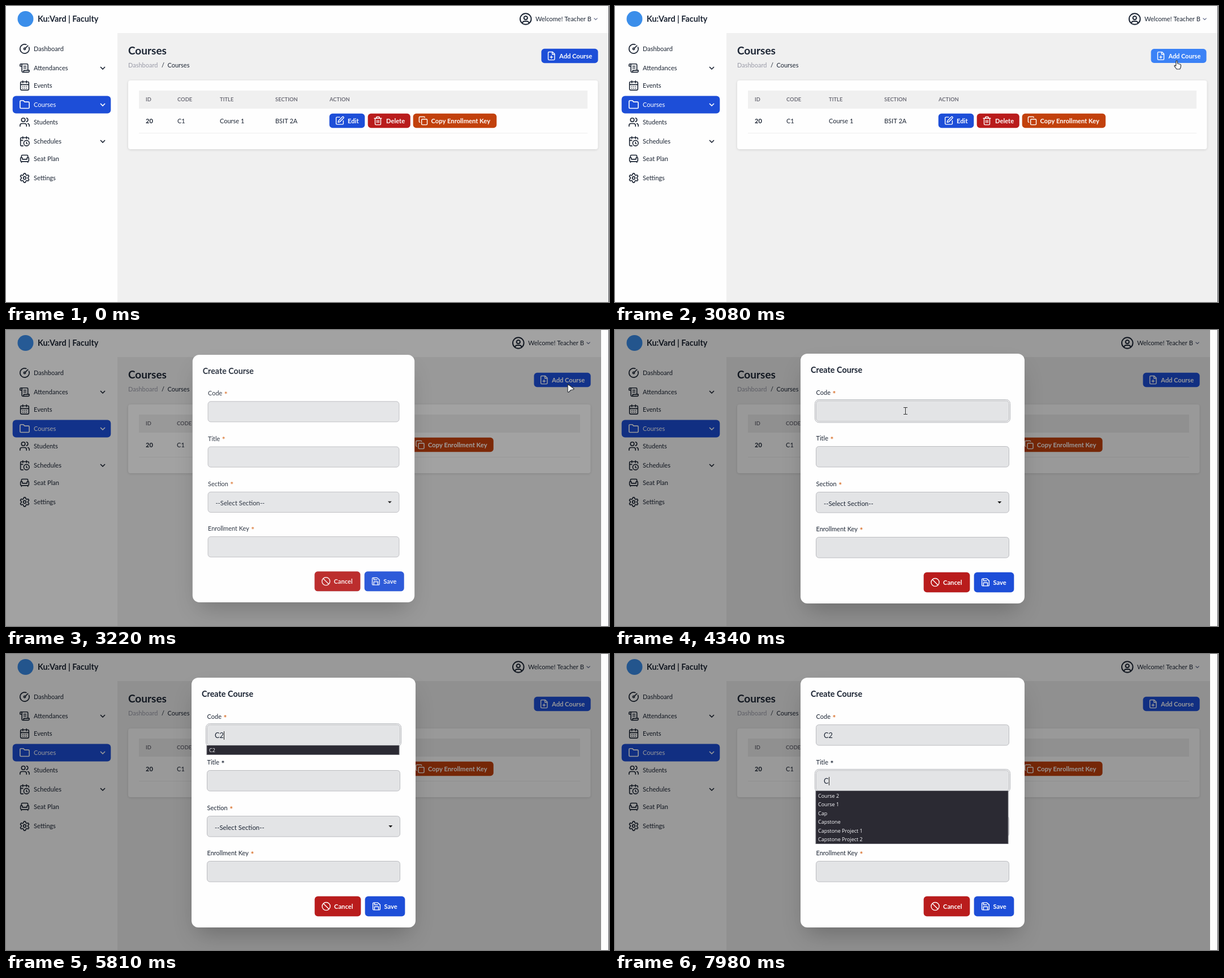
An HTML page with a canvas that plays this animation: 1066x525 px, repeating every 8000 ms.

```html
<!DOCTYPE html>
<html lang="en">
<head>
<meta charset="utf-8">
<title>Courses</title>
<style>
  html, body { margin: 0; width: 100%; height: 100%; overflow: hidden; background: #fff; }
  canvas { display: block; width: 1066px; height: 525px; }
</style>
</head>
<body>
<canvas id="stage" width="1066" height="525"></canvas>
<script>
const ctx = document.getElementById('stage').getContext('2d');
const LOOP = 8000, STEP = 70, OPEN_AT = 3110;
const INK = '#1b2433', BLUE = '#1d4ed8', RED = '#b91c1c', ORANGE = '#c2410c';

const circle = (x, y, r) => `M${x - r} ${y}a${r} ${r} 0 1 0 ${2 * r} 0a${r} ${r} 0 1 0 ${-2 * r} 0`;
const box = (x, y, w, h) => `M${x + 2} ${y}h${w - 4}a2 2 0 0 1 2 2v${h - 4}a2 2 0 0 1-2 2h${4 - w}a2 2 0 0 1-2-2v${4 - h}a2 2 0 0 1 2-2z`;

// Six-toothed gear outline in polar form
function gearPath() {
  let d = '';
  for (let i = 0; i < 96; i++) {
    const a = i / 96 * Math.PI * 2, r = 8.6 + 1.5 * Math.tanh(2 * Math.cos(6 * (a + Math.PI / 2)));
    d += `${i ? 'L' : 'M'}${12 + r * Math.cos(a)} ${12 + r * Math.sin(a)}`;
  }
  return d + 'z' + circle(12, 12, 3);
}

const navIcons = {
  gauge: 'M15.6 2.7a10 10 0 1 0 5.7 5.7M13.4 10.6 19 5' + circle(12, 12, 2),
  scroll: 'M15 12h-5M15 8h-5M19 17V5a2 2 0 0 0-2-2H4M8 21h12a2 2 0 0 0 2-2v-2H10v2a2 2 0 1 1-4 0V5a2 2 0 1 0-4 0v3h4',
  calendar: 'M8 2v4M16 2v4M3 10h18' + box(3, 4, 18, 18) + [8, 12, 16].map(x => `M${x} 14h.01M${x} 18h.01`).join(''),
  folder: 'M20 20a2 2 0 0 0 2-2V8a2 2 0 0 0-2-2h-8l-3-3H4a2 2 0 0 0-2 2v13a2 2 0 0 0 2 2z',
  users: 'M16 21v-2a4 4 0 0 0-4-4H6a4 4 0 0 0-4 4v2M22 21v-2a4 4 0 0 0-3-3.9M16 3.1a4 4 0 0 1 0 7.8' + circle(9, 7, 4),
  clock: 'M21 7.5V6a2 2 0 0 0-2-2H5a2 2 0 0 0-2 2v14a2 2 0 0 0 2 2h3.5M16 2v4M8 2v4M3 10h5M17.5 17.5 16 16.3V14' + circle(16, 16, 6),
  seat: 'M19 9V6a2 2 0 0 0-2-2H7a2 2 0 0 0-2 2v3M3 16a2 2 0 0 0 2 2h14a2 2 0 0 0 2-2v-5a2 2 0 0 0-4 0v2H7v-2a2 2 0 0 0-4 0zM5 18v2M19 18v2',
  gear: gearPath()
};
const toolIcons = {
  user: circle(12, 12, 10) + circle(12, 10, 3.2) + 'M6.2 18.9a4 4 0 0 1 3.8-2.9h4a4 4 0 0 1 3.8 2.9',
  filePlus: 'M15 2H6a2 2 0 0 0-2 2v16a2 2 0 0 0 2 2h12a2 2 0 0 0 2-2V7zM14 2v6h6M9 15h6M12 12v6',
  edit: 'M12 3H5a2 2 0 0 0-2 2v14a2 2 0 0 0 2 2h14a2 2 0 0 0 2-2v-7M18.4 2.6a2.1 2.1 0 0 1 3 3L12 15l-4 1 1-4z',
  trash: 'M3 6h18M19 6v14a2 2 0 0 1-2 2H7a2 2 0 0 1-2-2V6M8 6V4a2 2 0 0 1 2-2h4a2 2 0 0 1 2 2v2M10 11v6M14 11v6',
  copy: box(8, 8, 14, 14) + 'M4 16a2 2 0 0 1-2-2V4a2 2 0 0 1 2-2h10a2 2 0 0 1 2 2',
  ban: circle(12, 12, 10) + 'M4.9 4.9l14.2 14.2',
  save: 'M15 3H5a2 2 0 0 0-2 2v14a2 2 0 0 0 2 2h14a2 2 0 0 0 2-2V8zM17 21v-8H7v8M7 3v5h8'
};
const icons = {};
for (const [k, d] of Object.entries({ ...navIcons, ...toolIcons })) icons[k] = new Path2D(d);

function rect(x, y, w, h, color) { ctx.fillStyle = color; ctx.fillRect(x, y, w, h); }

function round(x, y, w, h, r, fill, stroke) {
  ctx.beginPath();
  ctx.roundRect(x, y, w, h, r);
  if (fill) { ctx.fillStyle = fill; ctx.fill(); }
  if (stroke) { ctx.strokeStyle = stroke; ctx.lineWidth = 1; ctx.stroke(); }
}

function text(s, x, y, size = 11.1, color = INK, weight = 400, family = 'Lato') {
  ctx.font = `${weight} ${size}px ${family}, sans-serif`;
  ctx.fillStyle = color;
  ctx.fillText(s, x, y);
  return ctx.measureText(s).width;
}

function icon(name, cx, cy, size, color) {
  ctx.save();
  ctx.translate(cx - size / 2, cy - size / 2);
  ctx.scale(size / 24, size / 24);
  ctx.strokeStyle = color;
  ctx.lineWidth = 2;
  ctx.lineCap = ctx.lineJoin = 'round';
  ctx.stroke(icons[name]);
  ctx.restore();
}

function chevron(cx, cy, w, color, width) {
  ctx.beginPath();
  ctx.moveTo(cx - w, cy - w / 2);
  ctx.lineTo(cx, cy + w / 2);
  ctx.lineTo(cx + w, cy - w / 2);
  ctx.strokeStyle = color;
  ctx.lineWidth = width;
  ctx.stroke();
}

function button(x, y, w, h, color, name, iconX, label, labelX) {
  round(x - 0.3, y - 0.2, w + 0.6, h + 0.4, 5.5, color);
  icon(name, x + iconX, y + h / 2, 17, '#fff');
  text(label, x + labelX, y + h / 2 + 4.2, 11.2, '#fff', 700);
}

function shadow(color, blur, dy) { ctx.shadowColor = color; ctx.shadowBlur = blur; ctx.shadowOffsetY = dy; }

const clamp = v => Math.max(0, Math.min(1, v));
const mix = (a, b, k) => `rgb(${a.map((v, i) => Math.round(v + (b[i] - v) * k))})`;

const nav = [
  ['gauge', 'Dashboard', 76], ['scroll', 'Attendances', 110, 1], ['calendar', 'Events', 141],
  ['folder', 'Courses', 175, 1], ['users', 'Students', 206], ['clock', 'Schedules', 240, 1],
  ['seat', 'Seat Plan', 271], ['gear', 'Settings', 305]
];

function page(t, opened) {
  const right = opened ? 1052 : 1065;
  rect(0, 0, 1066, 525, '#fefefe');
  rect(197, 48, right - 197, 477, '#f0f0f0');

  ctx.beginPath();
  ctx.arc(34.5, 23, 14, 0, 7);
  ctx.fillStyle = '#3b8eea';
  ctx.fill();
  text('Ku:Vard | Faculty', 56, 28, 14.4, INK, 700);
  icon('user', right - 146.3, 23, 23.5, INK);
  text('Welcome! Teacher B', right - 129, 27, 11);
  chevron(right - 22.5, 23, 3, '#6b7390', 1.1);

  for (const [name, label, y, more] of nav) {
    const active = label === 'Courses', color = active ? '#fff' : INK;
    if (active) round(11.7, 159.4, 173.6, 31.2, 6, BLUE);
    icon(name, 33, y, 19.5, color);
    text(label, 49, y + 4, 11.1, color);
    if (more) chevron(171, y, 4, color, 1.7);
  }

  text('Courses', 216, 86, 19, INK, 700);
  text('Dashboard', 216, 109, 11, '#9a9ba8');
  text('/', 275, 109, 11);
  text('Courses', 285.5, 109, 11);

  const hover = opened ? 0 : clamp((t - 2770) / 150);
  const press = !opened && t >= 2940 ? 0.978 : 1;
  ctx.save();
  ctx.translate(right - 68.5, 88.5);
  ctx.scale(press, press);
  button(-49.8, -12.5, 99.6, 25, mix([29, 78, 216], [59, 130, 246], hover), 'filePlus', 17.5, 'Add Course', 31.3);
  ctx.restore();

  ctx.save();
  shadow('rgba(0,0,0,.13)', 4, 1);
  round(216, 132, right - 234.5, 122, 4, '#fefefe');
  ctx.restore();
  rect(235, 150, right - 272, 32, '#f0f0f0');
  rect(235, 225, right - 272, 1, '#eeeeee');

  const col = x => opened ? 247 + (x - 247) * 0.983 : x;
  const cols = [['ID', '20', 247], ['CODE', 'C1', 303], ['TITLE', 'Course 1', 378], ['SECTION', 'BSIT 2A', 476], ['ACTION', '', 572]];
  cols.forEach(([head, cell, x], i) => {
    text(head, col(x), 169, 9.4, '#6f6f79', 700);
    text(cell, col(x), 208, 11, INK, i ? 400 : 700);
  });
  const bx = col(572);
  button(bx, 191, 62, 25, BLUE, 'edit', 18, 'Edit', 32);
  button(bx + 68, 191, 74.5, 25, RED, 'trash', 17.5, 'Delete', 32);
  button(bx + 148, 191, 147, 25, ORANGE, 'copy', 17.5, 'Copy Enrollment Key', 31.5);
}

const fieldTop = { Code: 125.5, Title: 206.5, Section: 287.5, 'Enrollment Key': 367.5 };

function field(label, starColor) {
  const y = fieldTop[label];
  const w = text(label, 355.5, y - 10.5, 11);
  text('*', 355.5 + w + 3.5, y - 8, 14, starColor, 700);
  round(355.5, y, 341, 36.5, 5, '#e3e4e6', '#bbbcc0');
}

function ring(y, alpha) {
  ctx.save();
  ctx.globalAlpha *= alpha;
  round(353.5, y - 2, 345, 40.5, 7, null, '#aeb0b5');
  ctx.restore();
}

function typed(s, top, caret) {
  const w = text(s, 369, top + 23.5, 12.8, INK);
  if (caret) rect(Math.round(369 + w), top + 11.5, 1, 15, '#222');
}

function suggest(list, top) {
  const h = list.length * 15.5 + 1.5;
  rect(354.5, top, 341, h, '#6a6a72');
  rect(355.5, top + 0.5, 339, h - 1.5, '#2b2a33');
  list.forEach((s, i) => text(s, 359, top + 12 + i * 15.5, 9, '#fbfbfe', 400, '"Open Sans"'));
}

const codeList = ['C2', 'C1', 'CC', 'CAP', 'CAP1', 'CAP2'];
const titleList = ['Course 2', 'Course 1', 'Cap', 'Capstone', 'Capstone Project 1', 'Capstone Project 2'];
const caretToggles = [3640, 4340, 4900, 5390, 5740, 6090, 6300, 6790, 7210, 7840, 7980];

function modal(t) {
  const k = 1 - (1 - clamp((t - OPEN_AT) / 200)) ** 3;
  ctx.save();
  rect(0, 0, 1052, 525, `rgba(0,0,0,${0.4 * k})`);
  ctx.translate(526, 263.5);
  ctx.scale(0.9 + 0.1 * k, 0.9 + 0.1 * k);
  ctx.translate(-526, -263.5);
  ctx.save();
  shadow(`rgba(0,0,0,${0.25 * k})`, 40, 20);
  round(338, 52, 376, 423, 12, '#fefefe');
  ctx.restore();
  // The panel turns solid sooner than its content
  ctx.globalAlpha = clamp(k * 1.1);
  round(328, 42, 396, 443, 12, '#fefefe');
  ctx.globalAlpha = k;

  text('Create Course', 346, 76, 14.4, INK, 700);
  for (const label in fieldTop) field(label, label === 'Title' && t >= 5110 ? INK : '#d9702a');
  text('--Select Section--', 369, 311.5, 11.4);
  ctx.beginPath();
  ctx.moveTo(676.3, 304);
  ctx.lineTo(683.3, 304);
  ctx.lineTo(679.8, 307.7);
  ctx.fillStyle = '#111';
  ctx.fill();

  round(545.5, 429.5, 82, 36, 6, '#dfe3ee');
  round(634.5, 429.5, 71, 36, 6, '#dfe3ee');
  button(546, 430, 81, 35, RED, 'ban', 20, 'Cancel', 34);
  button(635, 430, 70, 35, BLUE, 'save', 20, 'Save', 33.5);

  const onTitle = t >= 7350;
  const caret = caretToggles.filter(x => x <= t).length % 2 === 1;
  if (t >= 3640) ring(fieldTop[onTitle ? 'Title' : 'Code'], onTitle ? 1 : clamp((t - 3570) / 280));
  const code = t < 5110 ? '' : t < 5740 ? 'C' : t >= 5880 && t < 7210 ? 'C2 ' : 'C2';
  typed(code, fieldTop.Code, caret && !onTitle);
  if (onTitle) typed(t >= 7980 ? 'C' : '', fieldTop.Title, caret);
  if (t >= 5180 && t < 5740) suggest(codeList, 162);
  if (t >= 5740 && t < 5880) suggest(['C2'], 162);
  if (t >= 7980) suggest(titleList, 242.5);
  ctx.restore();
}

// Pointer paths: start time, then one position per step
const moves = [
  [210, [[1010, 503], [999, 427], [919, 332], [807, 294], [666, 352], [657, 410], [666, 429]]],
  [770, [[670, 430], [677, 430], [684, 429], [694, 417], [697, 411], [689, 413]]],
  [1960, [[722, 394], [759, 372], [826, 332], [899, 285], [969, 204], [972, 172], [962, 152], [970, 130], [978, 115], [983, 104], [985, 99], [986, 97]]],
  [2800, [[988, 96]]],
  [3150, [[992, 95], [992, 95], [910, 101], [775, 117], [640, 132], [550, 141], [513, 143]]]
];

function shape(points, x, y) {
  ctx.beginPath();
  for (const [px, py] of points) ctx.lineTo(x + px, y + py);
  ctx.closePath();
  ctx.fillStyle = '#fafafa';
  ctx.strokeStyle = '#30343a';
  ctx.lineWidth = 1.2;
  ctx.lineJoin = 'round';
  ctx.fill();
  ctx.stroke();
}

const arrow = [[1, 1], [12, 9], [11.5, 10.5], [6.5, 11.5], [2.5, 15.5], [1, 15]];
const hand = [[4, 1], [6, 1], [6.5, 6], [11.5, 7.5], [12.5, 9], [12, 13], [10.5, 16], [5, 16], [1, 11], [1.2, 9.3], [3.5, 10.3]];

function beam(x, y) {
  rect(x, y - 6, 1, 13, '#333');
  for (const dy of [-6, 6]) {
    rect(x - 3, y + dy, 3, 1, '#333');
    rect(x + 1, y + dy, 3, 1, '#333');
  }
}

function pointer(t) {
  const run = moves.filter(m => m[0] <= t).pop();
  if (!run || t >= 5110) return;
  const [start, pts] = run;
  const [x, y] = pts[Math.min(pts.length - 1, Math.floor((t - start) / STEP))];
  if (start === 2800) shape(hand, x, y);
  else if (start === 3150 && x < 696) beam(x, y);
  else shape(arrow, x, y);
}

function frame(now) {
  const t = Math.floor((now % LOOP) / STEP) * STEP;
  const opened = t >= OPEN_AT;
  page(t, opened);
  if (opened) modal(t);
  pointer(t);
  rect(1065, 0, 1, 525, '#55565c');
  requestAnimationFrame(frame);
}
requestAnimationFrame(frame);
</script>
</body>
</html>
```
